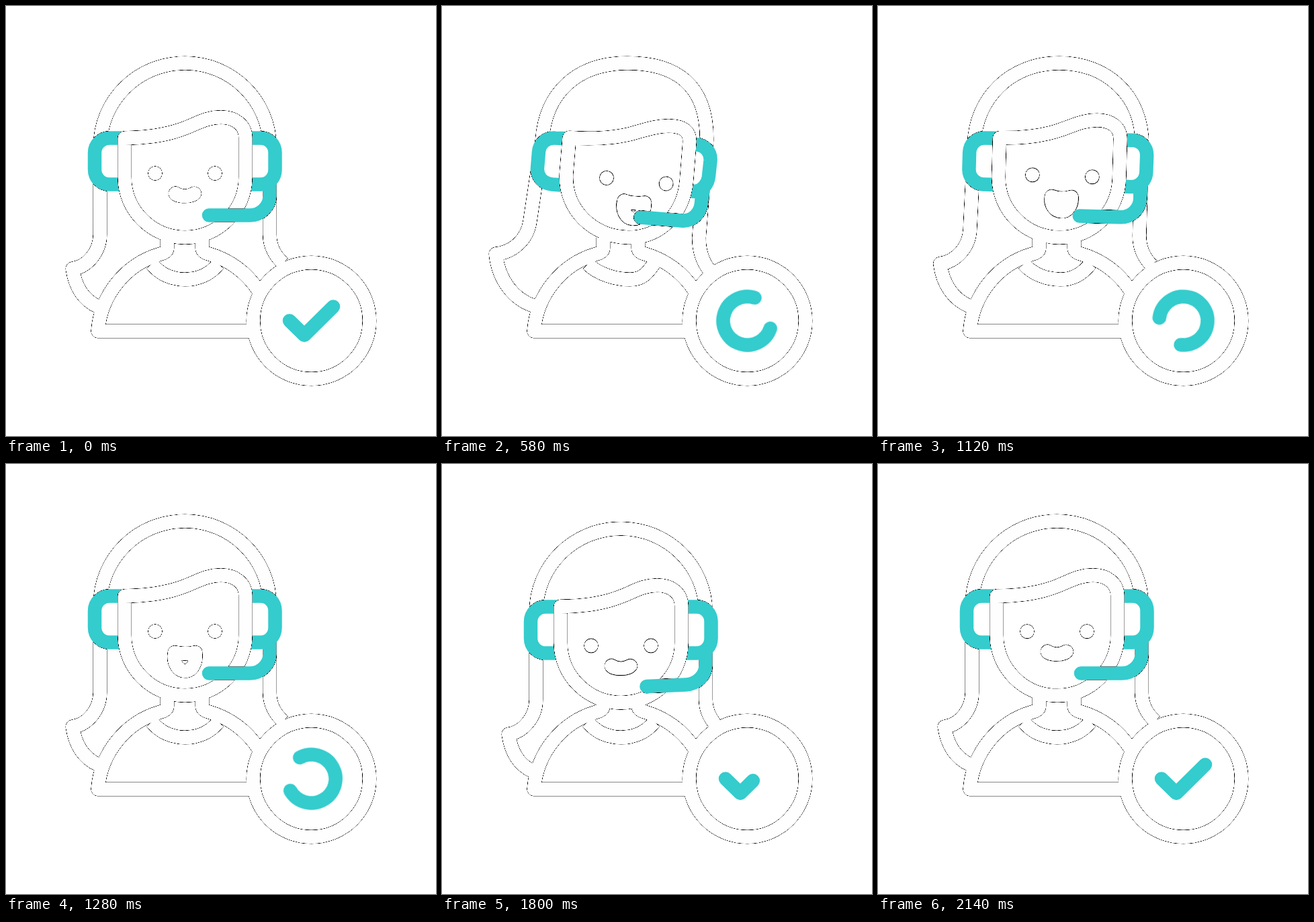
Recreate the animation shown at these times as an HTML page without scripts. Size 640 px wide and 640 px high, loop 2160 ms.

```html
<!DOCTYPE html>
<html lang="en">
<head>
<meta charset="utf-8">
<title>Support agent</title>
<style>
html, body { margin: 0; width: 100%; height: 100%; overflow: hidden; background: #fff; }
svg { display: block; width: 100vw; height: 100vh; }
path, circle { fill: none; stroke-width: 20.5; stroke-linejoin: round; }
.line { stroke: #fefefe; }
.teal { stroke: #34cccd; }
.cut { stroke: #000; }
.cut .ear { fill: #000; }
.mic, .arc, .check { stroke-linecap: round; }
.eye { fill: #fefefe; stroke: none; }

/* head: rest, tilt, hold, rest, nod, rest */
.hair, .face, .left, .right, .mic, .collar, .features, .mouth {
  animation: 2160ms cubic-bezier(.35, 0, .65, 1) infinite;
}
.hair { animation-name: hair; }
.face { animation-name: face; }
.left { animation-name: left; }
.right { animation-name: right; }
.mic { animation-name: mic; }
.collar { animation-name: collar; }
.features { animation-name: features; transform-origin: 266.5px 249px; }
.mouth { animation-name: mouth; }

@keyframes hair {
  0%, 59.26%, 100% { d: path("M136 447C115 437 103 418 99 391C122 388 140 365 140 340L140 210C140 141 196 85 266.5 85C336 85 392.5 141 392.5 210L392.5 340C392.5 358 401 373 413 383"); }
  18.52%, 40.74% { d: path("M136 446C108 437 84 409 80 369C104 367 127 349 131 320L149 200C154 130 200 85 276 85C347 85 395 116 394 200L382.5 345C382.5 365 388 380 397 392"); }
  77.78%, 81.48% { d: path("M134 457C115 448 103 430 99 402.5C122 399 140 376 140 351L140 221.5C140 152 196 96.5 266.5 96.5C336 96.5 392.5 152 392.5 221.5L392.5 351C392.5 366 398 377 406 387"); }
}
@keyframes face {
  0%, 59.26%, 100% { d: path("M176.5 196.5C214 196 244 191 268 181C288 173 300 165.5 320 165.5C342 165.5 356.5 178 356.5 196L356.5 254.5C356.5 304 316 344.5 266.5 344.5C217 344.5 176.5 304 176.5 254.5Z"); }
  18.52%, 40.74% { d: path("M189.5 196C226 198.5 254 196.5 278 191C298 186 318 178 338 178.5C359 179 369.5 186 368.5 203L364 259C360 309 325 345 277 344.5C226 344 182.5 304 185 250Z"); }
  77.78%, 81.48% { d: path("M176.5 212.5C214 212 244 207 268 197C288 189 300 181 320 181C342 181 356.5 193 356.5 212L356.5 266C356.5 315 316 355.5 266.5 355.5C217 355.5 176.5 315 176.5 266Z"); }
}
@keyframes left {
  0%, 59.26%, 100% { d: path("M172 196.5L154 196.5C142 196.5 132 206 132 218.5L132 243.5C132 256 142 265.5 154 265.5L172 265.5"); }
  18.52%, 40.74% { d: path("M190 197.5L168 196.5C155 195.5 145 205 144 217L142 241C141 254 150 264 164 265.5L185 267"); }
  77.78%, 81.48% { d: path("M172 213L154 213C142 213 132 222.5 132 235L132 260C132 272.5 142 282 154 282L172 282"); }
}
@keyframes right {
  0%, 59.26%, 100% { d: path("M360 196.5L379 196.5C391 196.5 400.5 206 400.5 218.5L400.5 243.5C400.5 256 391 265.5 379 265.5L360 265.5"); }
  18.52%, 40.74% { d: path("M368 205.5L378 206C391 207 400.5 217 399.5 230L397 253C396 266 386 276 375 276L362 274"); }
  77.78%, 81.48% { d: path("M360 213L379 213C391 213 400.5 222.5 400.5 235L400.5 260C400.5 272.5 391 282 379 282L360 282"); }
}
@keyframes mic {
  0%, 59.26%, 100% { d: path("M302 311.5L363 311.5C379 311.5 392.5 298.5 392.5 283L392.5 264"); }
  18.52%, 40.74% { d: path("M295.5 314.5L356 319.5C373 321 385 308 386 293L389 270"); }
  77.78%, 81.48% { d: path("M304.5 331.5L363 329C379 328 392.5 316 392.5 300L392.5 281"); }
}
@keyframes collar {
  0%, 59.26%, 100% { d: path("M217 384C229 399 247 407 266.5 407C286 407 304 399 316 384"); }
  18.52%, 40.74% { d: path("M217 384C232 399 258 407 280 407C299 407 306 397 316 383"); }
}
@keyframes features {
  0%, 59.26%, 100% { transform: translate(0, 0) rotate(0deg); }
  18.52%, 40.74% { transform: translate(22.8px, 11.2px) rotate(5.5deg); }
  77.78%, 81.48% { transform: translate(0, 22px) rotate(0deg); }
}
@keyframes mouth {
  0%, 77.78%, 100% { d: path("M252 279Q266 287 280.5 279C278 282 273 283 266.5 283C260 283 254 282 252 279Z"); }
  33.33%, 59.26% { d: path("M251 280.5Q266 284 282 280.5C284 296 277 308 266.5 308C256 308 248 296 251 280.5Z"); }
  44.44% { d: path("M252 279.5Q266 286 280.5 279.5C281 289 275 295.5 266.5 295.5C258 295.5 251 289 252 279.5Z"); }
}

/* badge: check leaves, ring spins, check returns */
.check {
  stroke-dasharray: 100 200;
  animation: check 2160ms ease-in-out infinite, checkOn 2160ms step-end infinite;
}
@keyframes check {
  0% { stroke-dashoffset: 0; }
  12.96% { stroke-dashoffset: -100; }
  12.97%, 75.92% { stroke-dashoffset: 100; }
  88.89%, 100% { stroke-dashoffset: 0; }
}
@keyframes checkOn {
  0%, 75.92% { opacity: 1; }
  12.95% { opacity: 0; }
}
.arc {
  transform-origin: 454.5px 468.5px;
  animation: spin 2160ms linear infinite, trim 2160ms linear infinite, arcOn 2160ms step-end infinite;
}
@keyframes spin {
  0%, 12.96% { transform: rotate(-72deg); }
  26.85% { transform: rotate(18deg); }
  44.44% { transform: rotate(132deg); }
  59.26% { transform: rotate(241deg); }
  68.52% { transform: rotate(283deg); }
  75.93%, 100% { transform: rotate(560deg); }
}
@keyframes trim {
  0%, 12.96% { stroke-dasharray: 0 360; animation-timing-function: ease-in-out; }
  24.07%, 68.52% { stroke-dasharray: 269.5 90.5; }
  75.93%, 100% { stroke-dasharray: 0 360; }
}
@keyframes arcOn {
  0%, 75.92% { opacity: 0; }
  12.95% { opacity: 1; }
}
</style>
</head>
<body>
<svg viewBox="0 0 640 640">
  <defs>
    <!-- hairline along the edge of the merged white shapes -->
    <filter id="edge" filterUnits="userSpaceOnUse" x="0" y="0" width="640" height="640">
      <feGaussianBlur in="SourceAlpha" stdDeviation=".55"/>
      <feComponentTransfer result="rim">
        <feFuncA type="table" tableValues="0 .55 1 1 .55 0"/>
      </feComponentTransfer>
      <feMerge>
        <feMergeNode in="SourceGraphic"/>
        <feMergeNode in="rim"/>
      </feMerge>
    </filter>
    <mask id="noMic" maskUnits="userSpaceOnUse" x="0" y="0" width="640" height="640">
      <rect width="640" height="640" fill="#fff"/>
      <g class="cut"><path class="mic"/></g>
    </mask>
    <mask id="noEars" maskUnits="userSpaceOnUse" x="0" y="0" width="640" height="640">
      <rect width="640" height="640" fill="#fff"/>
      <g class="cut"><path class="ear left"/><path class="ear right"/></g>
    </mask>
  </defs>

  <g class="teal">
    <path class="left"/>
    <path class="right"/>
    <path class="mic"/>
  </g>

  <g filter="url(#edge)">
    <g class="line" mask="url(#noMic)">
      <g mask="url(#noEars)"><path class="hair"/></g>
      <path class="face"/>
      <path class="collar"/>
      <path d="M240 345V360Q240 366 230 369A130 130 0 0 0 136.8 484H370"/>
      <path d="M292 345V360Q292 366 302 369A130 130 0 0 1 376 424"/>
      <circle cx="454.5" cy="468.5" r="86.5"/>
      <g class="features">
        <circle class="eye" cx="222" cy="249" r="10.5"/>
        <circle class="eye" cx="311" cy="249" r="10.5"/>
        <path class="mouth"/>
      </g>
    </g>
  </g>

  <g class="teal">
    <circle class="arc" cx="454.5" cy="468.5" r="36" pathLength="360"/>
    <path class="check" d="M422 468.5L444 490L487 447.5" pathLength="100"/>
  </g>
</svg>
</body>
</html>
```
